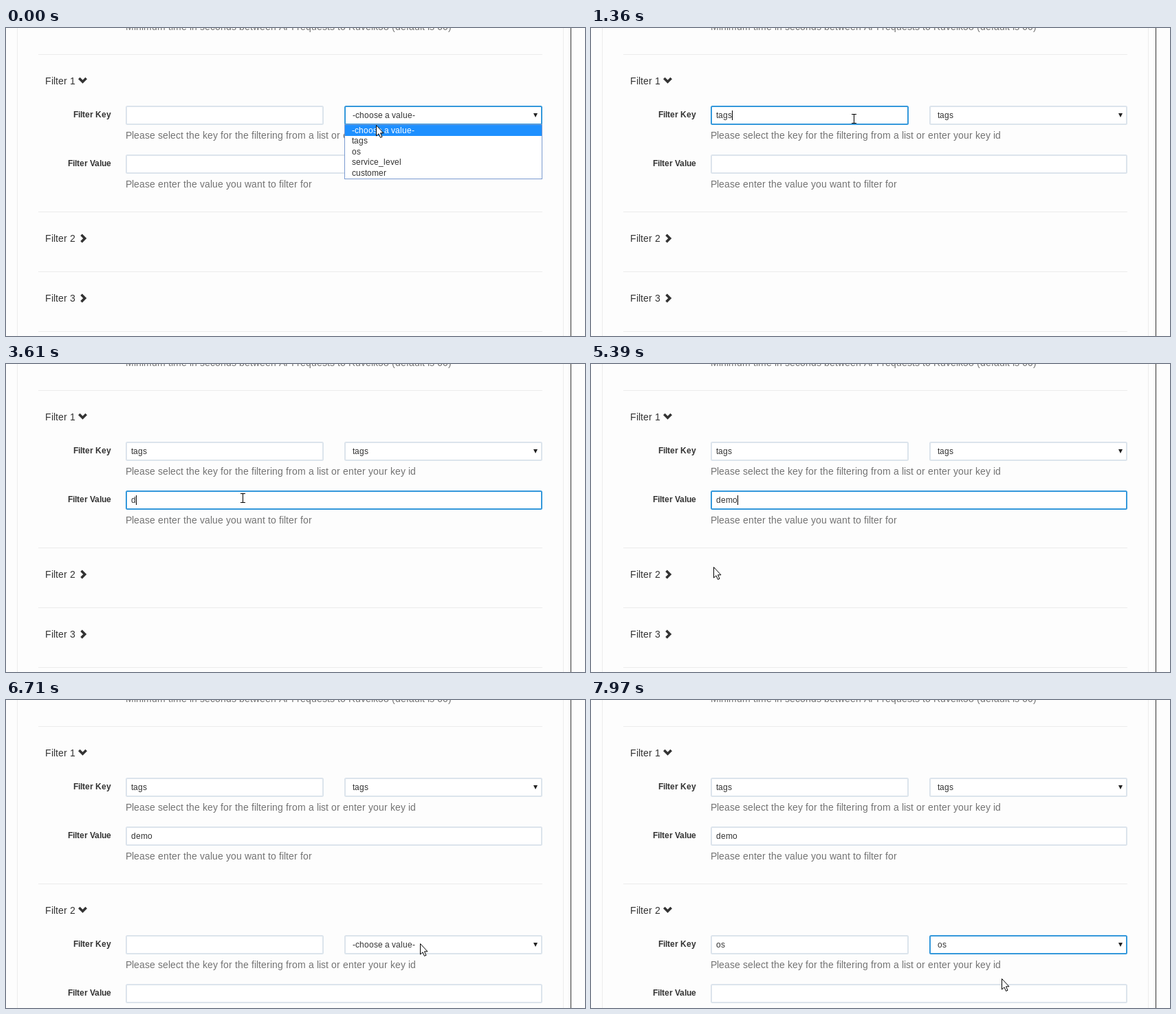
Write an HTML page that moves like this. It is 842x448 px and loops after 8000 ms.

```html
<!DOCTYPE html>
<html lang="en">
<head>
<meta charset="utf-8">
<title>Filter form</title>
<style>
  html, body { margin: 0; width: 100%; height: 100%; overflow: hidden; background: #fdfdfd; }
  svg { display: block; }
  text { font: 14px "Liberation Sans", Arial, sans-serif; fill: #333; }
  .small { font-size: 12px; }
  .bold { font-size: 12px; font-weight: bold; }
  .help { fill: #737373; }
  .rule { fill: #ececec; }
  .field { fill: #fff; stroke: #dce4ec; stroke-width: 2; }
  .field.focus { stroke: #3498db; }
  .chevron { fill: none; stroke: #333; stroke-width: 3.6; }
  .underline { fill: none; }
  .hover text, .hover .underline { fill: #f00; }
  .hover .chevron { stroke: #f00; }
  .picked { fill: #fff; }
  .hidden { display: none; }
</style>
</head>
<body>
<svg id="stage" width="842" height="448" viewBox="0 0 842 448"></svg>
<script>
const LOOP = 8000;
const STEP = 135;          // pointer refresh interval
const BLINK = 530;         // caret half period
const TYPE_BEAT = 270;     // two keys per beat while typing
const GROUP_STEP = 229;
const ROW = 15.5;
const OPTIONS = ['-choose a value-', 'tags', 'os', 'service_level', 'customer'];
const TIMES = {
  pickTags: 580, focusKey: 1230, focusValue: 2490, type: 3610,
  expand: 5790, openList: 6850, pickOs: 7970
};

const stage = document.getElementById('stage');
const ruler = document.createElement('canvas').getContext('2d');

function add(parent, tag, attrs) {
  const el = document.createElementNS('http://www.w3.org/2000/svg', tag);
  for (const key in attrs) el.setAttribute(key, attrs[key]);
  return parent.appendChild(el);
}
const rect = (parent, x, y, width, height, cls, more) =>
  add(parent, 'rect', { x, y, width, height, class: cls, ...more });
const group = (parent, y = 0) => add(parent, 'g', { transform: `translate(0 ${y})` });
const show = (el, on) => el.classList.toggle('hidden', !on);

// Advances and kerning are rounded to whole pixels, as in hinted screen text.
function advances(str, cls = '') {
  const size = /small|bold/.test(cls) ? 12 : 14;
  ruler.font = `${/bold/.test(cls) ? 'bold ' : ''}${size}px "Liberation Sans", Arial, sans-serif`;
  const width = s => ruler.measureText(s).width;
  return [...str].map((c, i) => {
    const next = str[i + 1] || '';
    return Math.round(width(c)) + Math.round(width(c + next) - width(c) - width(next));
  });
}
const widthOf = (str, cls) => advances(str, cls).reduce((a, b) => a + b, 0);

function write(el, x, str) {
  if (el.textContent === str) return;
  let pen = x;
  const xs = advances(str, el.getAttribute('class')).map(w => (pen += w) - w);
  el.setAttribute('x', xs.join(' '));
  el.textContent = str;
}
function text(parent, x, y, str, cls = '') {
  const el = add(parent, 'text', { y, class: cls });
  write(el, x, str);
  return el;
}

function header(parent, n, y) {
  const g = group(parent, y);
  const title = `Filter ${n}`;
  text(g, 57, 82, title);
  rect(g, 57, 83, widthOf(title), 1, 'underline');
  return { g, chevron: add(g, 'path', { class: 'chevron', d: 'M-5.2 -3L0 2.2 5.2 -3' }) };
}
const turn = (chevron, open) => chevron.setAttribute('transform',
  open ? 'translate(111.5 76)' : 'translate(112.5 77) rotate(-90)');

function form(y) {
  const g = group(stage, y);
  const label = (str, base) => text(g, 153 - widthOf(str, 'bold'), base, str, 'bold');
  const field = (x, top, w) => rect(g, x + 1, top + 1, w - 2, 26, 'field', { rx: 1.5 });
  label('Filter Key', 130);
  label('Filter Value', 201);
  text(g, 174, 161, 'Please select the key for the filtering from a list or enter your key id', 'help');
  text(g, 174, 232, 'Please enter the value you want to filter for', 'help');
  const boxes = { key: field(174, 113, 288), select: field(492, 113, 288), value: field(174, 184, 606) };
  add(g, 'path', { d: 'M767 124H773L770 130Z', fill: '#222' });
  const texts = {
    key: text(g, 182, 131, '', 'small'),
    select: text(g, 504, 131, '', 'small'),
    value: text(g, 182, 202, '', 'small')
  };
  return { g, boxes, texts };
}

// Page
const rule = (parent, y) => rect(parent, 47, y, 733, 1, 'rule');
for (const x of [16, 810]) rect(stage, x, 0, 1, 448, 'rule');
rect(stage, 821, 0, 1, 448, '', { fill: '#333' });
text(stage, 174, 3, 'Minimum time in seconds between API requests to Ruvelk58 (default is 60)', 'help');
rule(stage, 38);
rule(stage, 267);
turn(header(stage, 1, 0).chevron, true);
const second = header(stage, 2, GROUP_STEP);
const collapsed = group(stage);
rule(collapsed, 354);
rule(collapsed, 441);
turn(header(collapsed, 3, 316).chevron, false);
const forms = [form(0), form(GROUP_STEP)];
const caret = rect(stage, 0, 0, 1, 14);

// Option list
const list = group(stage);
rect(list, 492.5, 140.5, 287, 79, '', { fill: '#fff', stroke: '#7b9bd0' });
const bar = rect(list, 493, 141, 286, 16, '', { fill: '#1e90ff' });
const options = OPTIONS.map((name, i) => text(list, 503, Math.floor(153 + ROW * i), name, 'small'));

// Pointers, each with its hot spot at 0,0
const pointers = { arrow: group(stage), beam: group(stage), hand: group(stage) };
add(pointers.arrow, 'path', { d: 'M.5 .5V16L4 12.8 6.5 18.4 9 17.3 6.5 11.8H11Z', fill: '#fff', stroke: '#000' });
add(pointers.beam, 'path', { d: 'M-3 -6.5H4M.5 -6V6M-3 6.5H4', stroke: '#000' });
for (const [stroke, width] of [['#000', 5], ['#fff', 3]])
  add(pointers.hand, 'path', {
    d: 'M0 2V14M3.5 9V14M6.5 9.5V14M9 11V14L7.5 21.5H2L-4.5 12.5 0 15Z',
    fill: '#fff', stroke, 'stroke-width': width, 'stroke-linecap': 'round', 'stroke-linejoin': 'round'
  });

// Pointer path: a few strokes, each eased towards its end point
const linear = p => p;
const easeOut = p => 1 - (1 - p) ** 3;
const smooth = p => p * p * (3 - 2 * p);
const strokes = [
  { from: 0, to: 270, x: 535, y: 162, ease: linear },
  { from: 580, to: 1360, x: 382, y: 132, ease: smooth },
  { from: 1620, to: 2040, x: 344, y: 195, ease: smooth },
  { from: 4970, to: 5390, x: 177.5, y: 295, ease: linear },
  { from: 5390, to: 5660, x: 104, y: 299, ease: linear },
  { from: 5920, to: 6850, x: 614, y: 355, ease: easeOut },
  { from: 7020, to: 7270, x: 613, y: 379, ease: linear },
  { from: 7270, to: 7690, x: 597, y: 405, ease: linear }
];

function pointerAt(t) {
  let x = 538, y = 141;
  for (const s of strokes) {
    if (t < s.from) break;
    const steps = Math.round((s.to - s.from) / STEP);
    const p = s.ease(Math.min(1, Math.floor((t - s.from) / (s.to - s.from) * steps) / steps));
    x += (s.x - x) * p;
    y += (s.y - y) * p;
  }
  return { x, y };
}

function focusAt(t) {
  if (t >= TIMES.openList) return [1, 'select', TIMES.openList];
  if (t >= TIMES.expand) return [];
  if (t >= TIMES.focusValue) return [0, 'value', TIMES.focusValue];
  if (t >= TIMES.focusKey) return [0, 'key', TIMES.focusKey];
  return [0, 'select', 0];
}

const inside = (p, x, y, w, h) => p.x >= x && p.x < x + w && p.y >= y && p.y < y + h;

function render(t) {
  const past = name => t >= TIMES[name];
  const pos = pointerAt(t);
  const expanded = past('expand');
  const listGroup = !past('pickTags') ? 0 : past('openList') && !past('pickOs') ? 1 : -1;
  const listOpen = listGroup >= 0;
  const [focusGroup, focusName, focusTime] = focusAt(t);

  // Field contents
  const beats = Math.floor((t - TIMES.type) / TYPE_BEAT);
  const typed = 'demo'.slice(0, Math.max(0, 1 + 2 * beats));
  const choices = [past('pickTags') ? 1 : 0, past('pickOs') ? 2 : 0].map(i => OPTIONS[i]);
  forms.forEach(({ boxes, texts }, i) => {
    write(texts.select, 504, choices[i]);
    write(texts.key, 182, choices[i] === OPTIONS[0] ? '' : choices[i]);
    write(texts.value, 182, i === 0 ? typed : '');
    for (const name in boxes)
      boxes[name].classList.toggle('focus', focusGroup === i && focusName === name);
  });

  // Second group
  const onLink = inside(pos, 57, 298, 61, 16);
  show(forms[1].g, expanded);
  show(collapsed, !expanded);
  turn(second.chevron, expanded);
  second.g.classList.toggle('hover', onLink);

  // Caret restarts its blink on focus and on every typed beat
  const editable = focusName === 'key' || focusName === 'value';
  const lastKey = typed && editable ? TIMES.type + TYPE_BEAT * Math.min(beats, 2) : focusTime;
  show(caret, editable && Math.floor((t - lastKey) / BLINK) % 2 === 0);
  caret.setAttribute('x', 182 + widthOf(focusName === 'key' ? choices[0] : typed, 'small'));
  caret.setAttribute('y', focusName === 'key' ? 120 : 191);

  // Open list highlights the row under the pointer
  const shift = Math.max(0, listGroup) * GROUP_STEP;
  const row = Math.max(0, Math.floor((pos.y - 141 - shift) / ROW));
  show(list, listOpen);
  list.setAttribute('transform', `translate(0 ${shift})`);
  bar.setAttribute('y', Math.floor(141 + ROW * row));
  options.forEach((el, i) => el.classList.toggle('picked', i === row));

  const overField = !listOpen && forms.some((f, i) => (i === 0 || expanded) &&
    (inside(pos, 174, 113 + GROUP_STEP * i, 288, 28) || inside(pos, 174, 184 + GROUP_STEP * i, 606, 28)));
  const kind = onLink ? 'hand' : overField ? 'beam' : 'arrow';
  for (const name in pointers) {
    show(pointers[name], name === kind);
    pointers[name].setAttribute('transform', `translate(${Math.round(pos.x)} ${Math.round(pos.y)})`);
  }
}

const start = performance.now();
function tick() {
  render((performance.now() - start) % LOOP);
  requestAnimationFrame(tick);
}
tick();
</script>
</body>
</html>
```
